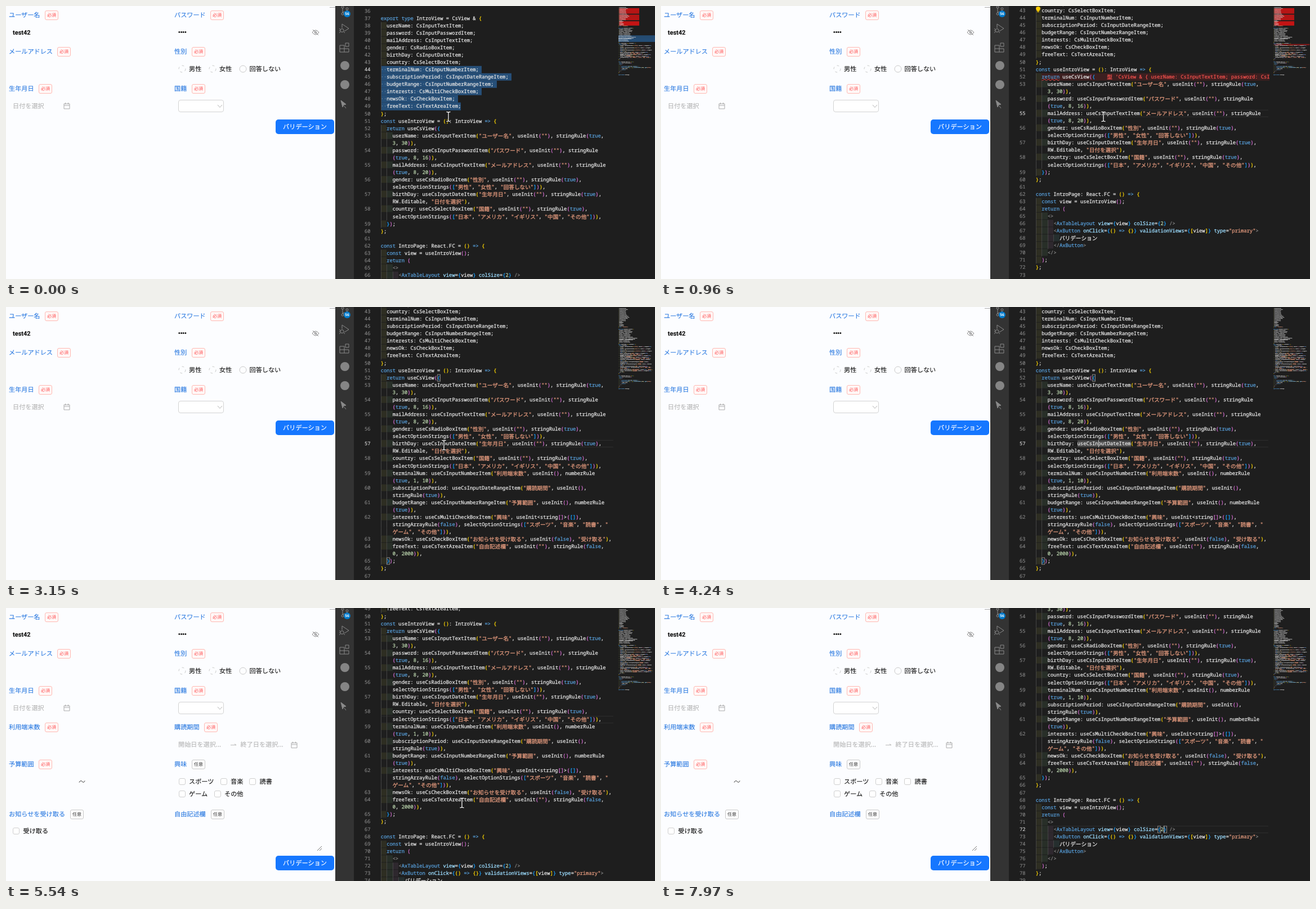
These frames come from a looping animation (1153x486 px, 8000 ms). An HTML page:

```html
<!DOCTYPE html>
<html lang="ja">
<head>
<meta charset="utf-8">
<title>Form and view code</title>
<style>
html, body { margin: 0; width: 100%; height: 100%; overflow: hidden; background: #fcfdff; }
body { position: relative; text-rendering: geometricPrecision; font: 11.15px/16px "Noto Sans CJK JP", "Noto Sans CJK", sans-serif; color: #111; }
div, svg { position: absolute; }
.t { white-space: pre; -webkit-text-stroke: .1px; }
.label { color: #2878e0; }
.hint { color: #b4b4b4; }
.user { font: 600 11px/16px Roboto, sans-serif; }
.tag { width: 22px; height: 15px; border: 1px solid #ffb9b3; border-radius: 3px; background: #fff8f7; color: #ff4d4f; font-size: 8px; line-height: 15px; text-align: center; }
.tag.any { border-color: #c9c9c9; background: #fdfdfd; color: #333; }
.check { width: 10px; height: 10px; border: 1px solid #cfcfcf; border-radius: 3px; background: #fff; }
.select { left: 306px; top: 167px; width: 79px; height: 20px; border: 1px solid #d3d3d3; border-radius: 4px; background: #fff; }
.button { left: 479px; width: 104px; height: 26px; border-radius: 5px; background: #1677ff; color: #fff; line-height: 26px; text-align: center; -webkit-text-stroke: .2px; }
.side { left: 585px; top: 0; width: 33px; height: 486px; background: #333; }
.editor { left: 618px; top: 0; width: 463px; height: 486px; overflow: hidden; background: #1e1e1e; }
.strip { left: 1081px; top: 0; width: 72px; height: 486px; background: #1e1e1e; }
.lines { left: 47.7px; top: 2.3px; font: 8.8px/13.07px "Noto Sans Mono", monospace; color: #e2e2e2; -webkit-text-stroke: .3px; }
.row { left: 0; width: 434px; height: 13.07px; white-space: pre; }
.row em { font: 9.63px/13px "Noto Sans CJK JP", "Noto Sans CJK", sans-serif; }
.row span, .row em { vertical-align: top; }
.num { left: -28.7px; color: #858585; -webkit-text-stroke: .15px; }
.num.on { color: #d6d6d6; }
.sel { display: inline-block; height: 13.07px; background: #264f78; }
.dot { color: #6d88a3; }
.guide { top: 0; width: 1px; height: 13.07px; background: #454545; }
.in0 { background: #2e2e22; } .in1 { background: #282f28; } .in2 { background: #2e282e; } .in3 { background: #252e2e; }
.err { background: #3d1f20; }
.lens { color: #f0504c; margin-left: 21px; }
.wavy { text-decoration: underline wavy #f14c4c .6px; text-underline-offset: 1px; }
.box { border: 1px solid #8a8a8a; box-sizing: border-box; width: 6px; height: 13px; }
.word { background: #4b4b4b; height: 13px; z-index: -1; }
.caret { width: 1px; height: 13px; background: #c8c8c8; }
.current { left: 0; width: 413px; height: 11px; border: solid #2e2e2e; border-width: 1px 0; z-index: -1; }
.under { isolation: isolate; }
.map { left: 1088px; top: 2px; width: 65px; height: 480px; overflow: hidden; }
.map .lines { left: 0; top: 0; transform: scale(.148); transform-origin: 0 0; -webkit-text-stroke: 1.3px; }
.map .num, .map .guide, .map .lens, .map .dot { display: none; }
.map .sel { width: 440px; }
.map .err { background: #8c1a1a; }
.map .red { width: 250px; background: #c81414; }
</style>
</head>
<body>
<script>
const CW = 5.28, RH = 13.07, FIRST = 18, TOP_LINE = 36;
const COLORS = { str: "#e0987c", key: "#569cd6", num: "#b5cea8", attr: "#9cdcfe", tag: "#808080" };
const PAIRS = ["#ffd700", "#da70d6", "#179fff"];

// "¦" marks a soft wrap
const types = ["userName: CsInputTextItem", "password: CsInputPasswordItem", "mailAddress: CsInputTextItem",
  "gender: CsRadioBoxItem", "birthDay: CsInputDateItem", "country: CsSelectBoxItem",
  "terminalNum: CsInputNumberItem", "subscriptionPeriod: CsInputDateRangeItem",
  "budgetRange: CsInputNumberRangeItem", "interests: CsMultiCheckBoxItem",
  "newsOk: CsCheckBoxItem", "freeText: CsTextAreaItem"];
const head = [...types.map(s => `  ${s.split(": ")[1]},`),
  "  CsView,", "  useCsView,", "  useInit,", "  stringRule,", "  numberRule,", `} from "../framework";`, "",
  "export type IntroView = CsView & {", ...types.map(s => `  ${s};`), "};",
  "const useIntroView = (): IntroView => {", "  return useCsView({",
  `    userName: useCsInputTextItem("ユーザー名", useInit(""), stringRule(true, ¦3, 30)),`,
  `    password: useCsInputPasswordItem("パスワード", useInit(""), stringRule¦(true, 8, 16)),`,
  `    mailAddress: useCsInputTextItem("メールアドレス", useInit(""), stringRule¦(true, 8, 20)),`,
  `    gender: useCsRadioBoxItem("性別", useInit(""), stringRule(true), ¦selectOptionStrings(["男性", "女性", "回答しない"])),`,
  `    birthDay: useCsInputDateItem("生年月日", useInit(""), stringRule(true), ¦RW.Editable, "日付を選択"),`,
  `    country: useCsSelectBoxItem("国籍", useInit(""), stringRule(true), ¦selectOptionStrings(["日本", "アメリカ", "イギリス", "中国", "その他"])),`];
const added = [
  `    terminalNum: useCsInputNumberItem("利用端末数", useInit(), numberRule¦(true, 1, 10)),`,
  `    subscriptionPeriod: useCsInputDateRangeItem("購読期間", useInit(), ¦stringRule(true)),`,
  `    budgetRange: useCsInputNumberRangeItem("予算範囲", useInit(), numberRule¦(true)),`,
  `    interests: useCsMultiCheckBoxItem("興味", useInit<string[]>([]), ¦stringArrayRule(false), selectOptionStrings(["スポーツ", "音楽", "読書", "¦ゲーム", "その他"])),`,
  `    newsOk: useCsCheckBoxItem("お知らせを受け取る", useInit(false), "受け取る"),`,
  `    freeText: useCsTextAreaItem("自由記述欄", useInit(""), stringRule(false, ¦0, 2000)),`];
const tail = ["  });", "};", "", "const IntroPage: React.FC = () => {", "  const view = useIntroView();", "  return (",
  "    <>", "      <AxTableLayout view={view} colSize={2} />",
  `      <AxButton onClick={() => {}} validationViews={[view]} type="primary">`,
  "        バリデーション", "      </AxButton>", "    </>", "  );", "};", "", "export default IntroPage;"];

const TOKEN = /(?<str>"[^"]*")|(?<attr>\b\w+(?==[{"]))|(?<key>=>|(?<=<\/?)Ax\w+|\b(?:export|default|from|type|const|return|true|false)\b)|(?<num>\b\d+\b)|(?<pair>[(){}\[\]])|(?<tag><\/?(?=Ax|>)|\/?>$)|(?<text>\w+|[^])/g;
const escape = s => s.replace(/&/g, "&amp;").replace(/</g, "&lt;");
const widen = s => s.replace(/[\u3000-\u9fff]+/g, "<em>$&</em>");

function buildCode(s) {
  const lines = s.added ? [...head, ...added, ...tail] : [...head, ...tail];
  const rowOf = {};
  let html = "", row = 0, depth = 1;
  lines.forEach((line, i) => {
    const no = FIRST + i, indent = line.search(/\S|$/);
    const selected = s.sel && no >= s.sel[0] && no <= s.sel[1];
    const spaces = t => selected ? t.replace(/ /g, '<span class="dot">·</span>') : t;
    const parts = [""];
    for (const m of line.slice(indent).matchAll(TOKEN)) {
      const kind = Object.keys(m.groups).find(k => m.groups[k] !== undefined);
      let color = COLORS[kind];
      if (kind === "pair") color = PAIRS[("([{".includes(m[0]) ? depth++ : --depth) % 3];
      m[0].split("¦").forEach((piece, k) => {
        if (k) parts.push("");
        if (!piece) return;
        const text = piece === " " ? spaces(piece) : widen(escape(piece));
        parts[parts.length - 1] += color ? `<span style="color:${color}">${text}</span>` : text;
      });
    }
    rowOf[no] = row;
    parts.forEach((part, k) => {
      let lead = "", guides = "";
      for (let c = 0; c < indent; c += 2) {
        lead += k ? "  " : `<span class="${selected ? "" : "in" + c / 2 % 4}">${spaces("  ")}</span>`;
        guides += `<div class="guide" style="left:${c * CW}px"></div>`;
      }
      const lastPart = k === parts.length - 1;
      let body = lead + part;
      if (selected) body = `<span class="sel">${body}${lastPart && no !== s.sel[1] ? " " : ""}</span>`;
      const bad = s.err && no === 52;
      if (bad) body = body.replace("return", '<span class="wavy">return</span>') +
        `<span class="lens"><em>型</em> 'CsView &amp; { userName: CsInputTextItem; password: CsInputPasswordItem</span>`;
      const cls = bad ? " err" : s.warn && no < 35 && no % 6 ? " red" : "";
      const num = k ? "" : `<div class="num${no === s.line ? " on" : ""}">${no}</div>`;
      html += `<div class="row${cls}" style="top:${(row++ * RH).toFixed(2)}px">${guides}${num}${body}</div>`;
    });
  });
  return { html, rowOf };
}

const place = (cls, x, y, text = "", extra = "") => `<div class="${cls}" style="left:${x}px;top:${y}px;${extra}">${text}</div>`;
const text = (x, y, str, cls = "") => place("t " + cls, x, y - 8, str);
const field = (x, y, name, tagX, any) => text(x, y, name, "label") + place("tag" + (any ? " any" : ""), tagX, y - 8.5, any ? "任意" : "必須");
const check = (x, y, name) => place("check", x, y - 6) + text(x + 18.5, y, name);
const icon = (x, y, color, body) => `<svg style="left:${x - 12}px;top:${y - 12}px" width="24" height="24" viewBox="-12 -12 24 24" fill="none" stroke="${color}">${body}</svg>`;
const calendar = (x, y) => icon(x, y, "#aaa", '<path d="M-5-4H5V5H-5ZM-5-1H5M-2.5-6v3M2.5-6v3"/>');
const radio = (x, name, dash) => icon(x, 112, "#c9c9c9", `<circle r="6" stroke-dasharray="${dash}"/>`) + text(x + 12, 112, name);

const basicForm = field(5, 16, "ユーザー名", 69) + field(299, 16, "パスワード", 363) +
  text(12, 47.5, "test42", "user") + place("t", 306, 39, "••••", "font:10.5px/16px 'Liberation Sans',sans-serif") +
  icon(549.5, 47, "#8c8c8c", '<path d="M-6 0Q0-8 6 0Q0 8-6 0ZM-5-5L5 5"/><circle r="1.8"/>') +
  field(5, 81, "メールアドレス", 91) + field(299, 81, "性別", 330) +
  radio(313, "男性", "4 5") + radio(367, "女性", "4 5") + radio(420.5, "回答しない", "none") +
  field(5, 147, "生年月日", 58) + field(299, 147, "国籍", 330) +
  text(12, 178, "日付を選択", "hint") + calendar(107.5, 178) +
  '<div class="select"></div>' + icon(379.5, 177.5, "#b5b5b5", '<path d="M-4-2L0 2.5L4-2"/>') +
  place("", 575, 2, "", "width:10px;height:1px;background:#aaa");
const extraForm = field(5, 212, "利用端末数", 69) + field(299, 212, "購読期間", 352) +
  text(306, 243, "開始日を選択...", "hint") + icon(404, 244, "#b5b5b5", '<path d="M-5 0H5L2-2"/>') +
  text(416.5, 243, "終了日を選択...", "hint") + calendar(512, 243.5) +
  field(5, 278, "予算範囲", 58) + field(299, 278, "興味", 330, true) +
  icon(135, 309, "#222", '<path d="M-5 1.5C-3-3 0-1 1 .5S4 1.5 5-1.5"/>') +
  check(306.5, 309, "スポーツ") + check(380.5, 309, "音楽") + check(432, 309, "読書") +
  check(306.5, 331, "ゲーム") + check(369.5, 331, "その他") +
  field(5, 367, "お知らせを受け取る", 114, true) + field(299, 367, "自由記述欄", 364, true) +
  check(12, 397, "受け取る") + icon(557, 428, "#777", '<path d="M-4 4L4-4M0 4L4 0"/>');

const side = icon(602, 8, "#8a8a8a", '<circle cx="-4" cy="-6" r="2"/><circle cx="-4" cy="6" r="2"/><circle cx="4" cy="-3" r="2"/><path d="M-4-4V4M4-1Q4 2-4 3"/>') +
  place("", 600, 7.5, "56", "width:12px;height:12px;border-radius:6px;background:#007acc;color:#fff;font:700 6.5px/12px 'Open Sans',sans-serif;text-align:center") +
  icon(601, 40, "#8a8a8a", '<path d="M-4-1V-8L8 0L0 5"/><circle cx="-4" cy="3.5" r="3"/><path d="M-9 0l2 2M-9 4h2M-9 8l2-2M1 8l-2-2"/>') +
  icon(601, 74, "#8a8a8a", '<path d="M-8-4H0V8H-8ZM-8 2H8V8H0M2-8H8V-2H2Z"/>') +
  [106, 140].map(y => icon(601.5, y, "none", '<circle r="8" fill="#858585"/>')).join("") +
  icon(599, 174, "#8a8a8a", '<path d="M-4-6L5 1L1 2L-1 6Z" fill="#8a8a8a"/><path d="M2 4l3 4"/>');
const beam = (color, width) => `<path stroke="${color}" stroke-width="${width}" d="M-3.5-8.5Q0-8.5 0-7Q0-8.5 3.5-8.5M0-7V7M-3.5 8.5Q0 8.5 0 7Q0 8.5 3.5 8.5"/>`;

document.body.innerHTML = `${basicForm}<div id="extra">${extraForm}</div><div class="button" id="button">バリデーション</div>
  <div class="side"></div>${side}
  <div class="editor"><div class="lines under" id="code"></div></div>
  <div class="strip"></div><div class="map"><div class="lines" id="map"></div></div>
  <div id="bulb">${icon(669.5, 6, "none", '<path d="M-4-1A4 4 0 1 1 4-1L2 3H-2ZM-1.5 3.5h3v1.5h-3Z" fill="#ffcc00"/>')}</div>
  <div id="mouse">${icon(0, 0, "none", beam("#111", 3) + beam("#fff", 1.3))}</div>`;
const $ = id => document.getElementById(id);

// Each step changes only the listed parts of the state
const steps = [
  [0, { y: 0, added: false, sel: [44, 49], line: 44, warn: true, err: false, mouse: [786, 197], boxes: [] }],
  [140, { y: 23 }], [270, { y: 48 }], [400, { y: 74 }], [530, { y: 92 }],
  [830, { sel: null, line: 55, cur: [55, 0] }], [960, { err: true, bulb: true }],
  [1250, { warn: false }], [1400, { bulb: false }],
  [1970, { added: true, sel: [59, 64], line: 59, cur: null, boxes: [[52, 19], [65, 2]] }],
  [2400, { err: false }],
  [3000, { sel: null, line: 57, cur: [57, 0, 21], mouse: [778, 246] }],
  [3570, { word: [57, 14, 18] }],
  [4120, { mouse: [1020, 469] }], [4240, { mouse: null }],
  [4820, { form: true }], [4950, { word: null, boxes: [], line: 0, cur: [58, 1], mouse: [810, 284] }],
  [5410, { y: 140, mouse: [810, 330] }], [5540, { y: 176.5, mouse: [810, 347] }],
  [5970, { y: 180, mouse: [815, 385] }], [6110, { y: 183, mouse: [822, 430] }], [6240, { mouse: [827, 460] }],
  [6680, { y: 196 }], [6830, { y: 215 }], [6970, { y: 234 }], [7120, { y: 242 }],
  [7260, { mouse: [850, 435] }], [7410, { mouse: [880, 408] }], [7550, { mouse: [897, 396] }],
  [7700, { line: 72, cur: [72, 0, 43], boxes: [[72, 41], [72, 43]] }],
  [7820, { mouse: [927, 477] }], [7970, { mouse: null }]];
let state = {};
const frames = steps.map(([at, change]) => ({ at, ...(state = { ...state, ...change }) }));

function show(s) {
  const { html, rowOf } = buildCode(s);
  const at = (cls, line, sub, col, extra) => place(cls, col * CW, ((rowOf[line] + sub) * RH).toFixed(2), "", extra);
  let marks = s.boxes.map(([line, col]) => at("box", line, 0, col)).join("");
  if (s.word) marks += at("word", s.word[0], 0, s.word[1], `width:${s.word[2] * CW}px`);
  if (s.cur) {
    marks += at("current", s.cur[0], s.cur[1], 0);
    if (s.cur[2]) marks += at("caret", s.cur[0], s.cur[1], s.cur[2]);
  }
  $("code").innerHTML = html + marks;
  $("map").innerHTML = html;
  $("code").style.transform = `translateY(${-rowOf[TOP_LINE] * RH - s.y}px)`;
  $("extra").style.display = s.form ? "" : "none";
  $("button").style.top = (s.form ? 440.5 : 201.5) + "px";
  $("bulb").style.display = s.bulb ? "" : "none";
  $("mouse").style.display = s.mouse ? "" : "none";
  if (s.mouse) $("mouse").style.transform = `translate(${s.mouse[0]}px,${s.mouse[1]}px)`;
}

let shown = null;
const start = performance.now();
function tick() {
  const t = (performance.now() - start) % 8000;
  const now = frames.findLast(f => f.at <= t);
  if (now !== shown) show(shown = now);
  requestAnimationFrame(tick);
}
tick();
</script>
</body>
</html>
```
